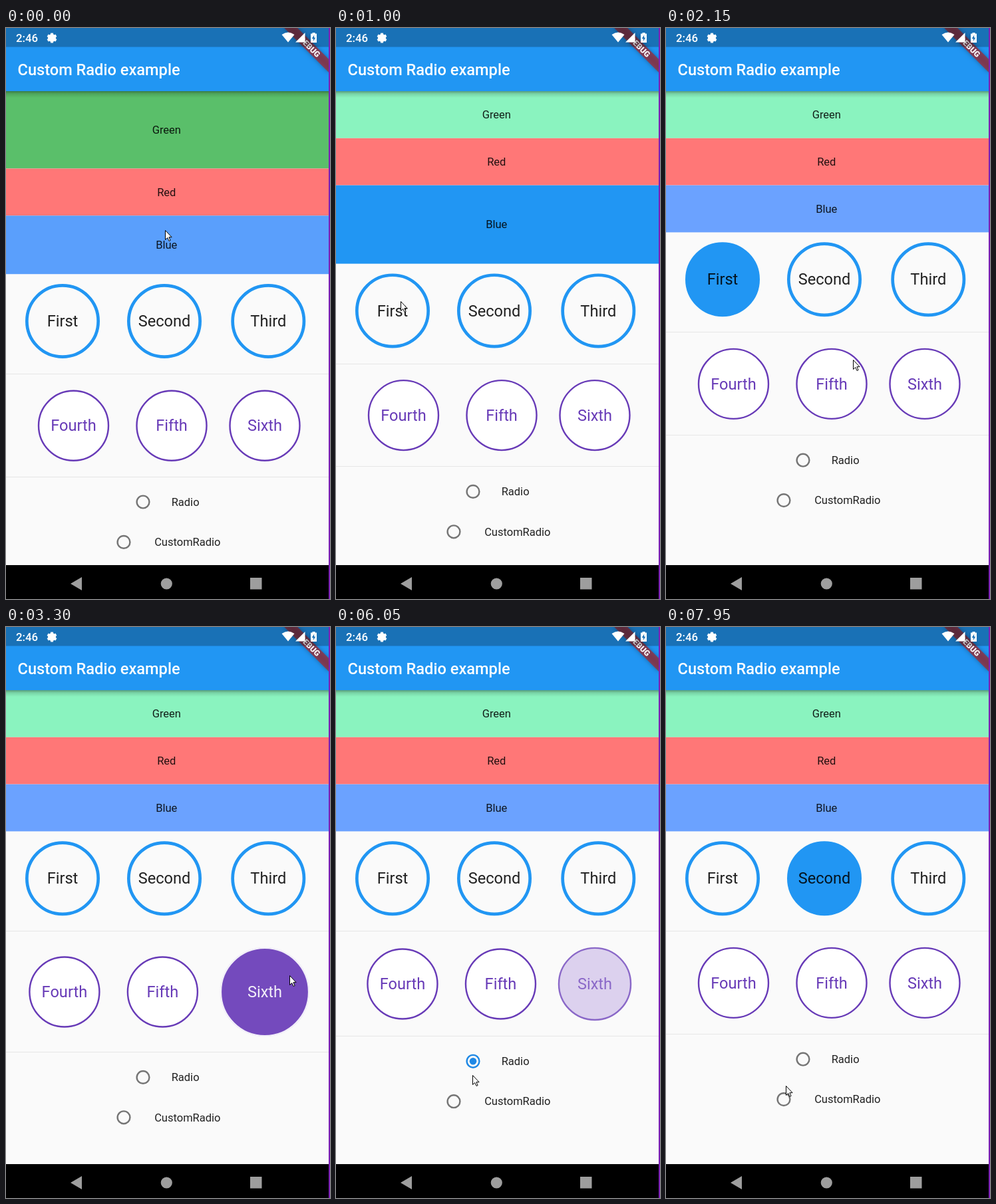
An HTML page with a canvas for the animation above (8 s loop, 487 by 859 pixels).

```html
<!DOCTYPE html>
<html lang="en">
<head>
<meta charset="utf-8">
<title>Custom Radio example</title>
<style>
  html, body { margin: 0; width: 100%; height: 100%; overflow: hidden; background: #000; }
  canvas { display: block; width: 487px; height: 859px; }
</style>
</head>
<body>
<canvas id="stage" width="487" height="859"></canvas>
<script>
const ctx = document.getElementById('stage').getContext('2d');
const LOOP = 8000, WIDTH = 485, BAR_TOP = 95, BAR_H = 70.8, BAR_GROW = 47.2;
const BLUE = [33, 150, 243], PURPLE = [103, 58, 183], WHITE = [255, 255, 255];
const INK = 'rgba(0,0,0,.87)';

// The screen only refreshes at these moments.
const range = (from, to, step = 50) =>
  Array.from({ length: (to - from) / step + 1 }, (_, i) => from + i * step);
const refreshes = [
  ...range(0, 1000), 1450, 1650, 1900, 2150, 2300, 2500, 2650, 2900, 3100, 3300, 3450,
  3600, 3800, 4000, 4200, ...range(5600, 5750), 5900, 6050, ...range(6200, 6950),
  ...range(7050, 7200), 7350, 7450, 7550, 7700, 7800, 7900, 7950
];

// Pointer path: time, x, y
const pointer = [
  [0, 239, 304], [250, 245, 250], [450, 246, 239], [850, 119, 401], [1000, 97, 411],
  [1650, 97, 411], [1900, 150, 440], [2150, 281, 499], [2300, 387, 516], [2500, 421, 523],
  [2650, 426, 524], [3300, 426, 524], [3450, 386, 540], [3600, 285, 589], [3800, 222, 649],
  [4000, 207, 673], [4200, 205, 680], [5600, 205, 680], [5750, 205, 674], [6200, 205, 674],
  [6950, 220, 386], [7200, 216, 390], [7550, 204, 491], [7950, 179.5, 690]
];

const clamp = v => Math.max(0, Math.min(1, v));
const mix = (a, b, v) => a + (b - a) * v;
const rgb = (a, b, v) => `rgb(${a.map((c, i) => Math.round(mix(c, b[i], v)))})`;

function bezier(x1, y1, x2, y2) {
  const at = (a, b, s) => 3 * a * s * (1 - s) ** 2 + 3 * b * s * s * (1 - s) + s ** 3;
  return x => {
    if (x <= 0 || x >= 1) return clamp(x);
    let lo = 0, hi = 1;
    for (let i = 0; i < 24; i++) {
      const mid = (lo + hi) / 2;
      if (at(x1, x2, mid) < x) lo = mid; else hi = mid;
    }
    return at(y1, y2, lo);
  };
}
const ease = bezier(.25, .1, .25, 1);
const easeInOut = bezier(.42, 0, .58, 1);

function pointerAt(t) {
  const next = pointer.findIndex(p => p[0] > t);
  if (next < 0) return pointer[pointer.length - 1].slice(1);
  const a = pointer[next - 1], b = pointer[next];
  const v = (t - a[0]) / (b[0] - a[0]);
  return [mix(a[1], b[1], v), mix(a[2], b[2], v)];
}

function rect(x, y, w, h, color) {
  ctx.fillStyle = color;
  ctx.fillRect(x, y, w, h);
}

function text(str, x, y, size, color, weight = 400, align = 'center') {
  ctx.font = `${weight} ${size}px Roboto, sans-serif`;
  ctx.textAlign = align;
  ctx.fillStyle = color;
  ctx.fillText(str, x, y + size * .35);
}

function disc(x, y, r, color) {
  ctx.beginPath();
  ctx.arc(x, y, r, 0, Math.PI * 2);
  ctx.fillStyle = color;
  ctx.fill();
}

function ring(x, y, outer, width, color) {
  ctx.beginPath();
  ctx.arc(x, y, outer - width / 2, 0, Math.PI * 2);
  ctx.lineWidth = width;
  ctx.strokeStyle = color;
  ctx.stroke();
}

function polygon(points, color) {
  ctx.beginPath();
  points.forEach(([x, y]) => ctx.lineTo(x, y));
  ctx.closePath();
  ctx.fillStyle = color;
  ctx.fill();
}

function bars(green, blue) {
  const rows = [
    ['Green', [138, 243, 191], [76, 176, 80], green],
    ['Red', [255, 119, 119], [255, 119, 119], 0],
    ['Blue', [107, 162, 255], BLUE, blue]
  ];
  let y = BAR_TOP;
  for (const [label, idle, active, v] of rows) {
    const h = BAR_H + BAR_GROW * ease(v);
    rect(0, y, WIDTH, h, rgb(idle, active, v));
    text(label, 241.3, y + h / 2, 16.5, INK);
    y += h;
  }
  return y;
}

function ringButton(label, x, y, v) {
  disc(x, y, 55, `rgba(${BLUE},${v})`);
  ring(x, y, 56, 4.7, rgb(BLUE, BLUE, 0));
  text(label, x, y, 23.6, INK);
}

function growButton(label, x, y, v) {
  const r = 53.7 + 13.8 * easeInOut(v), line = rgb(PURPLE, WHITE, v);
  disc(x, y, r - .5, rgb(WHITE, PURPLE, v));
  ring(x, y, r, 2.4, line);
  text(label, x, y, 23.6, line);
}

function radio(label, x, labelX, y, v) {
  const color = rgb([117, 117, 117], [30, 136, 229], v);
  ring(x, y, 10.6, 2.4, color);
  if (v > 0) disc(x, y, 5.3 * v, color);
  text(label, labelX, y, 16.5, INK);
}

function banner() {
  ctx.save();
  ctx.beginPath();
  ctx.rect(0, 0, WIDTH, 859);
  ctx.clip();
  ctx.translate(WIDTH, 0);
  ctx.rotate(Math.PI / 4);
  ctx.shadowColor = 'rgba(0,0,0,.5)';
  ctx.shadowBlur = 7;
  rect(-47.2, 33, 94.4, 14.2, 'rgba(183,28,28,.63)');
  ctx.shadowColor = 'transparent';
  text('DEBUG', 0, 40.1, 12, '#fff', 900);
  ctx.restore();
}

function gear(x, y) {
  ctx.save();
  ctx.translate(x, y);
  for (let i = 0; i < 3; i++) {
    rect(-2, -7.4, 4, 14.8, '#fff');
    ctx.rotate(Math.PI / 3);
  }
  ctx.restore();
  ring(x, y, 6, 3.4, '#fff');
}

function statusBar() {
  rect(0, 0, WIDTH, 28.5, 'rgba(0,0,0,.25)');
  text('2:46', 15, 15.2, 16.8, '#fff', 500, 'left');
  gear(69, 15);
  ctx.beginPath();
  ctx.moveTo(424, 21.5);
  ctx.lineTo(414.5, 10);
  ctx.quadraticCurveTo(424, 3, 433.5, 10);
  ctx.fillStyle = '#fff';
  ctx.fill();
  polygon([[435, 21.5], [449.5, 21.5], [449.5, 7]], '#fff');
  rect(458, 8.5, 9, 13.5, '#fff');
  rect(460.5, 7, 4, 2, '#fff');
  polygon([[463.2, 10.5], [459.8, 16], [462, 16], [461.8, 20], [465.2, 14.4], [463, 14.4]], '#1a70b6');
}

function navBar() {
  rect(0, 808, WIDTH, 51, '#000');
  polygon([[97, 836], [114, 826], [114, 846]], '#9e9e9e');
  disc(241.3, 836, 8.6, '#9e9e9e');
  rect(367, 827, 17.5, 17.5, '#9e9e9e');
}

function appBar() {
  const shade = ctx.createLinearGradient(0, 95, 0, 105);
  shade.addColorStop(0, 'rgba(0,0,0,.36)');
  shade.addColorStop(.4, 'rgba(0,0,0,.13)');
  shade.addColorStop(1, 'rgba(0,0,0,0)');
  rect(0, 95, WIDTH, 10, shade);
  rect(0, 0, WIDTH, 95, '#2196f3');
  text('Custom Radio example', 17.5, 62.5, 23.6, '#fff', 500, 'left');
}

function arrow([x, y]) {
  ctx.save();
  ctx.translate(Math.round(x) + .5, Math.round(y) + .5);
  polygon([[0, 0], [0, 14], [3.2, 11], [5.6, 16], [7.6, 15], [5.4, 10.2], [9.6, 10.2]], '#fff');
  ctx.lineWidth = 1;
  ctx.strokeStyle = '#000';
  ctx.stroke();
  ctx.restore();
}

function draw(t) {
  const ramp = (start, length) => clamp((t - start) / length);
  const blue = ramp(-184, 800) - ramp(1265, 800);
  const first = ramp(1265, 500) - ramp(2750, 500);
  const second = ramp(7030, 500);
  const sixth = ramp(2750, 600) - ramp(5590, 600);
  const picked = ramp(5580, 150) - ramp(7040, 150);

  rect(0, 0, 487, 859, '#fafafa');
  const base = bars(1 - ramp(-184, 800), blue);

  ringButton('First', 85, base + 70.8, first);
  ringButton('Second', 238, base + 70.8, second);
  ringButton('Third', 394.3, base + 70.8, 0);
  rect(0, Math.round(base + 150), WIDTH, 1, '#e6e6e6');

  const grow = 13.8 * easeInOut(sixth), rowY = base + 228 + grow;
  growButton('Fourth', 101.5 - grow, rowY, 0);
  growButton('Fifth', 249 - grow, rowY, 0);
  growButton('Sixth', 389, rowY, sixth);

  const below = base + 2 * grow;
  rect(0, Math.round(below + 304.6), WIDTH, 1, '#e6e6e6');
  radio('Radio', 206, 269.6, below + 342.8, picked);
  radio('CustomRadio', 177, 272.8, below + 403.2, 0);

  appBar();
  banner();
  statusBar();
  navBar();
  rect(WIDTH, 0, 2, 859, '#7b1fb5');
  arrow(pointerAt(t));
}

function tick(now) {
  const t = now % LOOP;
  draw(refreshes.findLast(r => r <= t));
  requestAnimationFrame(tick);
}
draw(0);
requestAnimationFrame(tick);
</script>
</body>
</html>
```
